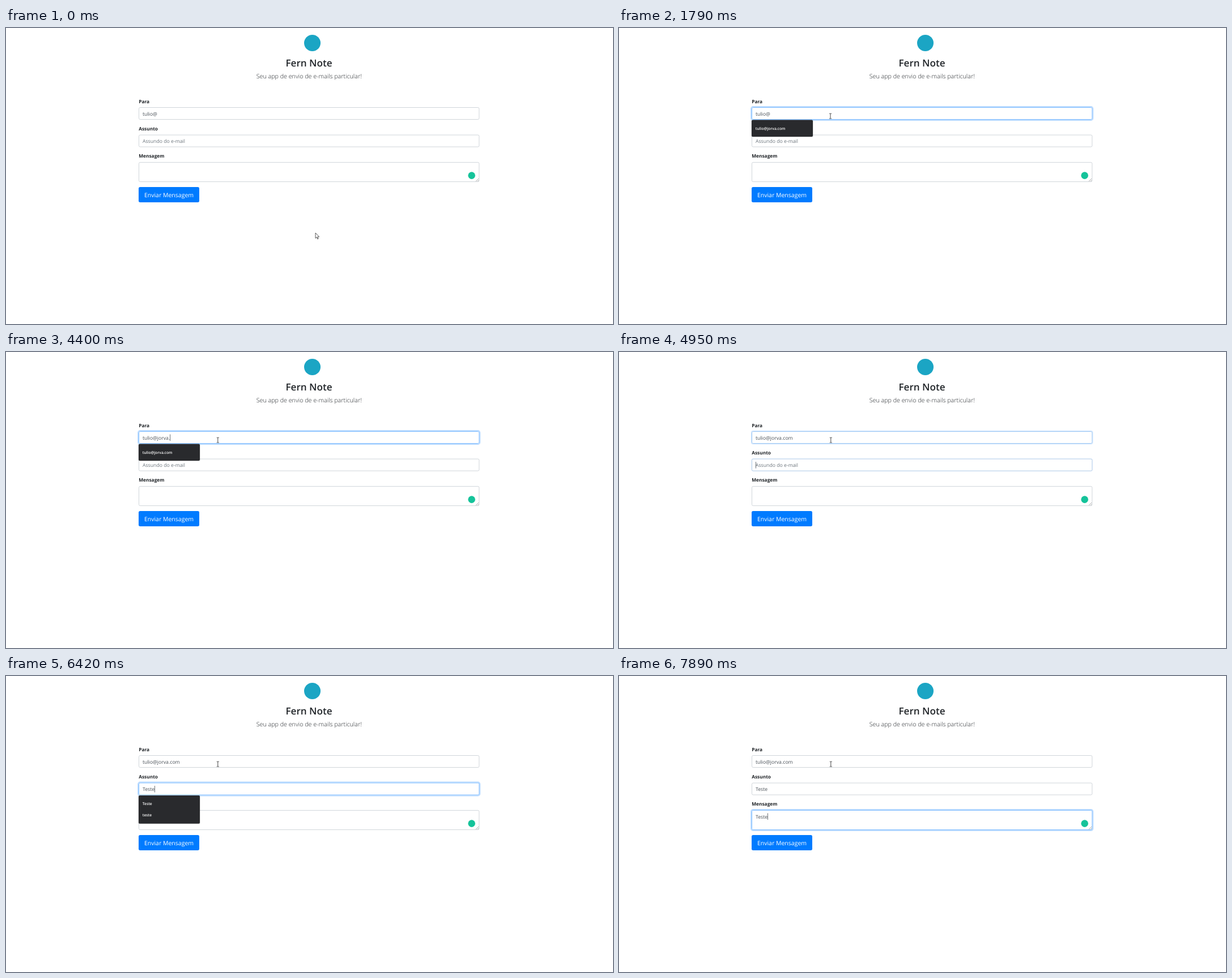
An HTML page that plays this animation: 1071 by 523 pixels, repeating every 8 s.

```html
<!DOCTYPE html>
<html lang="pt-BR">
<head>
<meta charset="utf-8">
<title>Fern Note</title>
<style>
html, body { margin: 0; width: 100%; height: 100%; overflow: hidden; background: #fff; }
svg { display: block; width: 100%; height: 100%; }
text { font: 400 8.68px "Open Sans", "Noto Sans", sans-serif; text-rendering: geometricPrecision; fill: #495057; }
.title { font-size: 17.1px; font-weight: 600; fill: #212529; text-anchor: middle; }
.lead { font-size: 10.7px; font-weight: 300; fill: #212529; text-anchor: middle; }
.label { font-size: 8.35px; font-weight: 700; fill: #212529; }
.hint { fill: #6c757d; }
.button { font-size: 10.5px; fill: #fff; text-anchor: middle; }
.item { font-size: 6.7px; font-weight: 600; fill: #fff; }
</style>
</head>
<body>
<svg id="stage" viewBox="0 0 1071 523">
  <circle cx="540.5" cy="26.5" r="14.5" fill="#1ba5c4"/>
  <text class="title" x="534.5" y="68">Fern Note</text>
  <text class="lead" x="534.7" y="89.2">Seu app de envio de e-mails particular!</text>
  <rect x="234" y="281" width="107" height="27" rx="2.7" fill="#007bff"/>
  <text class="button" x="287.5" y="298.8">Enviar Mensagem</text>
</svg>
<script>
const LOOP = 8000;
const stage = document.getElementById("stage");

function add(tag, attrs, parent = stage, text = "") {
  const el = document.createElementNS("http://www.w3.org/2000/svg", tag);
  set(el, attrs);
  el.textContent = text;
  return parent.appendChild(el);
}
function set(el, attrs) {
  for (const key in attrs) el.setAttribute(key, attrs[key]);
}
function show(el, on) {
  el.setAttribute("visibility", on ? "visible" : "hidden");
}

const clamp = v => Math.min(1, Math.max(0, v));
const smooth = v => { v = clamp(v); return v * v * (3 - 2 * v); };
const within = (spans, t) => spans.some(([from, to]) => t >= from && t < to);
const latest = (keys, t) => keys.reduce((found, [time, value]) => t >= time ? value : found, "");
const easeInOut = v => {
  v = clamp(v);
  return v < .5 ? .5 * (2 * v) ** 2.6 : 1 - .5 * (2 - 2 * v) ** 2.6;
};
const mix = (a, b, p) => a + (b - a) * p;

const user = "tulio@";
const fields = [
  {
    label: "Para", y: 140.5, h: 21, hint: "",
    focus: [1210, 4890],
    caretOn: [[1210, 1790], [2340, 3390], [3440, 4890]],
    menuOn: [[1320, 2440], [3440, 4750]],
    items: [user + "jorva.com"],
    keys: [[0, ""], [2440, "r"], [2590, "re"], [2840, "ret"], [3090, "re"], [3240, "r"],
      [3440, "jo"], [3710, "jor"], [3810, "jorv"], [3910, "jorva"], [4400, "jorva."],
      [4490, "jorva.c"], [4580, "jorva.co"], [4670, "jorva.com"]],
    prefix: user
  },
  {
    label: "Assunto", y: 189, h: 21, hint: "Assundo do e-mail",
    focus: [4890, 6640],
    caretOn: [[4890, 5460], [5920, 6640]],
    menuOn: [[6020, 6640]],
    items: ["Teste", "teste"],
    keys: [[5920, "T"], [6080, "Te"], [6160, "Tes"], [6420, "Teste"]],
    prefix: ""
  },
  {
    label: "Mensagem", y: 237.4, h: 34.2, hint: "",
    focus: [6640, LOOP + 1000],
    caretOn: [[6640, LOOP]],
    menuOn: [],
    items: [],
    keys: [[7250, "T"], [7440, "Te"], [7590, "Tes"], [7840, "Test"], [7890, "Teste"]],
    prefix: ""
  }
];

for (const f of fields) {
  add("text", { class: "label", x: 234.2, y: f.y - 8 }, stage, f.label);
  f.glow = add("rect", { fill: "none", stroke: "#007bff" });
  f.box = add("rect", { x: 234.5, y: f.y, width: 600.3, height: f.h, rx: 2.2, fill: "#fff" });
  f.hintText = add("text", { class: "hint", x: 241, y: f.y + 14.2 }, stage, f.hint);
  f.value = add("text", { x: 241, y: f.y + 14.2 });
  f.caret = add("rect", { y: f.y + 5, width: .8, height: 11.6, fill: "#495057" });
}

const misspelt = add("path", { d: "M241 156.2H259.3", stroke: "#e0393e", "stroke-width": .9, opacity: .85 });
add("path", { d: "M829 271L834 266M832 271L834 269", stroke: "#888", "stroke-width": .7 });
add("circle", { cx: 821.6, cy: 260.6, r: 6.3, fill: "#15c39a" });

for (const f of fields) {
  const top = f.y + f.h + 1;
  const height = 9 + 20.4 * f.items.length;
  f.menu = add("g", {});
  add("rect", { x: 233.5, y: top, width: 109, height: height + .8, rx: 2.4, fill: "#000", opacity: .22 }, f.menu);
  add("rect", { x: 234, y: top, width: 108, height, rx: 2, fill: "#292a2d" }, f.menu);
  f.items.forEach((name, i) =>
    add("text", { class: "item", x: 240.8, y: top + 17.1 + 20.2 * i }, f.menu, name));
}

const arrow = add("path", {
  d: "M0 0V9.5L2.2 7.5L3.7 10.9L5.1 10.3L3.6 7H6.6Z",
  fill: "#fff", stroke: "#222", "stroke-width": .75, "stroke-linejoin": "round"
});
const beam = add("path", {
  d: "M-2-4.4H-.5L0-4L.5-4.4H2M0-4V4M-2 4.4H-.5L0 4L.5 4.4H2",
  fill: "none", stroke: "#333", "stroke-width": .9
});

function drawField(f, t) {
  const [on, off] = f.focus;
  const p = smooth((t - on) / 150) - smooth((t - off) / 150);
  const spread = 1.9 * p;
  set(f.box, { stroke: `rgb(${mix(208, 128, p)},${mix(213, 189, p)},${mix(218, 255, p)})` });
  set(f.glow, {
    x: 234 - spread / 2, y: f.y - .5 - spread / 2,
    width: 601.3 + spread, height: f.h + 1 + spread, rx: 2.5 + spread / 2,
    "stroke-width": spread, "stroke-opacity": .27 * p
  });
  const typed = f.prefix + latest(f.keys, t);
  f.value.textContent = typed;
  show(f.hintText, !typed);
  set(f.caret, { x: 241 + (typed ? f.value.getComputedTextLength() : 0) });
  show(f.caret, within(f.caretOn, t));
  show(f.menu, within(f.menuOn, t));
}

function drawPointer(t) {
  // The pointer is sampled in thirteen hard steps.
  const step = t < 380 ? 0 : Math.floor((t - 380) / 56.6) + 1;
  const u = clamp(step / 13);
  const x = mix(546, 373, easeInOut(u / .84)) + (t >= 2400 ? .8 : 0);
  const y = mix(362, 155.6, easeInOut(u));
  const overField = fields.some(f => y >= f.y && y <= f.y + f.h);
  show(arrow, !overField);
  show(beam, overField);
  set(overField ? beam : arrow, { transform: `translate(${x} ${y})` });
}

function draw(t) {
  for (const f of fields) drawField(f, t);
  show(misspelt, t >= 3390 && t < 3440);
  drawPointer(t);
}

const start = performance.now();
function tick() {
  draw((performance.now() - start) % LOOP);
  requestAnimationFrame(tick);
}
tick();
</script>
</body>
</html>
```
